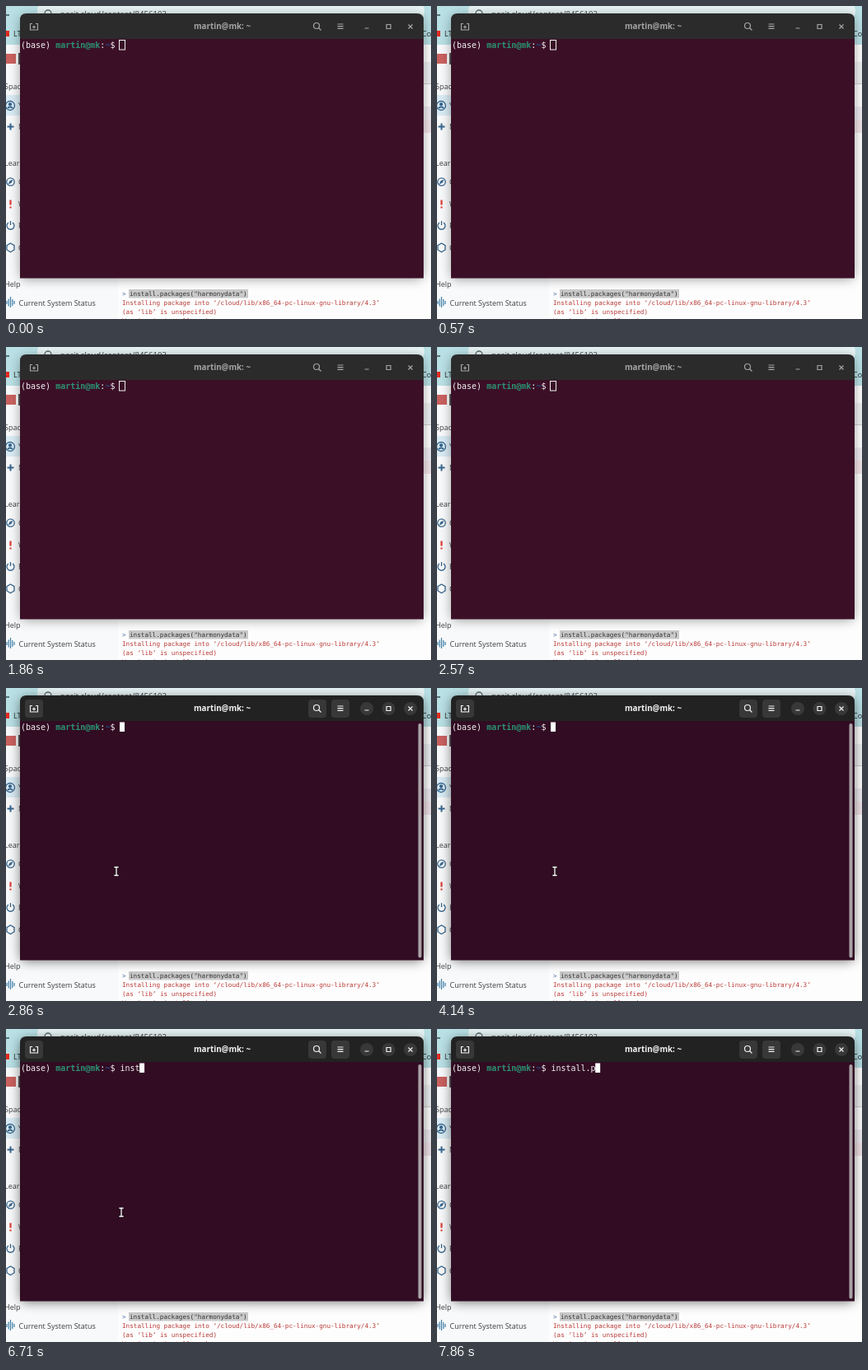
Recreate the animation shown at these times as an HTML page. Size 516 by 380 pixels, loop 8 s.

```html
<!DOCTYPE html>
<html lang="en">
<head>
<meta charset="utf-8">
<title>Terminal</title>
<style>
  html, body { margin: 0; width: 100%; height: 100%; overflow: hidden; background: #fbfbfb; }
  svg { display: block; width: 100%; height: 100%; }
  text { white-space: pre; }
  .ui { font: 9px "Open Sans", sans-serif; fill: #3c4043; }
  .console { font: 7.65px "DejaVu Sans Mono", monospace; fill: #b93a36; }
  .shell { font: 10px "DejaVu Sans Mono", monospace; fill: #f4f0f2; }
  .title { font: 700 9.8px "Open Sans", sans-serif; text-anchor: middle; }
  .line { fill: none; stroke: #35648c; stroke-width: 1.3; }
</style>
</head>
<body>
<svg viewBox="0 0 516 380">
  <defs>
    <filter id="blur" x="-10%" y="-10%" width="120%" height="120%"><feGaussianBlur stdDeviation="7"/></filter>
  </defs>

  <!-- browser -->
  <rect width="516" height="380" fill="#fdfdfd"/>
  <rect width="136" height="380" fill="#f8f9fa"/>
  <rect width="516" height="47" fill="#b9e0e5"/>
  <rect x="38" y="-8" width="470" height="28" rx="14" fill="#e6f2f3"/>
  <path d="M-3 11H4M20 11h8" stroke="#3b5054" stroke-width="1.4"/>
  <circle cx="51" cy="9" r="4" fill="none" stroke="#56696d" stroke-width="1.3"/>
  <text class="ui" x="66" y="13" style="font-size:9.6px">posit.cloud/content/8456103</text>
  <rect y="30" width="4" height="7" fill="#e32b20"/>
  <text class="ui" x="9" y="37" style="fill:#1d2a2c">LTI</text>
  <text class="ui" x="505" y="37" style="fill:#1d2a2c">Co</text>
  <rect x="506" y="68" width="10" height="26" fill="#eeeff1"/>
  <rect x="506" y="94" width="10" height="1" fill="#c9ccd0"/>
  <rect x="506" y="122" width="10" height="16" fill="#eeebf0"/>
  <rect x="506" y="138" width="10" height="16" fill="#f0e3e8"/>

  <!-- sidebar -->
  <rect y="58" width="12" height="12" fill="#c9615f"/>
  <rect x="15" y="57" width="2" height="14" fill="#555"/>
  <rect y="108" width="136" height="25" fill="#d9ebf4"/>
  <g class="ui">
    <text x="-2" y="101">Spaces</text>
    <text x="15" y="124">Your Workspace</text>
    <text x="15" y="150">New Space</text>
    <text x="-2" y="194">Learn</text>
    <text x="15" y="217">Guide</text>
    <text x="15" y="244">What's New</text>
    <text x="15" y="270">Recipes</text>
    <text x="15" y="297">Cheatsheets</text>
    <text x="-2" y="341">Help</text>
    <text x="15.500" y="364">Current System Status</text>
  </g>
  <g class="line">
    <circle cx="5" cy="121" r="5.500"/>
    <circle cx="5" cy="119.300" r="1.500" fill="#35648c"/>
    <path d="M2 124q3-3 6 0" stroke-width="2"/>
    <path d="M1.500 146.500h8M5.500 142.500v8" stroke-width="2"/>
    <circle cx="5.500" cy="213.500" r="4.700"/>
    <path d="M3 216l1.500-3.500L8 211l-1.500 3.500z" fill="#35648c" stroke-width=".5"/>
    <path d="M5.500 235.500v6M5.500 243.500v2" stroke="#dc3a35" stroke-width="2.200"/>
    <path d="M3 263a4.500 4.500 0 1 0 5 0M5.500 261v5"/>
    <path d="M5.500 288l4.500 2.700v5.300l-4.500 2.700L1 296v-5.300z"/>
    <path d="M1 358v4M3.200 355.500v9M5.500 353v13M7.800 356v8M10 358v4" stroke="#3f7fa8" stroke-width="1.200"/>
  </g>

  <!-- R console -->
  <rect x="149" y="344" width="145" height="10.500" fill="#c9c9c9"/>
  <g class="console">
    <text x="141" y="352" fill="#4b6fa5" style="fill:#4b6fa5">&gt;</text>
    <text x="150" y="352" style="fill:#333">install.packages("harmonydata")</text>
    <text x="141" y="362.500">Installing package into ‘/cloud/lib/x86_64-pc-linux-gnu-library/4.3’</text>
    <text x="141" y="374">(as ‘lib’ is unspecified)</text>
    <text x="141" y="384.500">Warning in install.packages :</text>
  </g>

  <!-- terminal -->
  <rect id="shadow" x="17" y="12" width="490" height="320" rx="8" filter="url(#blur)"/>
  <path id="body" d="M17 38H507V330.500H17z"/>
  <path id="bar" d="M17 40V17q0-8 8-8H499q8 0 8 8V40z"/>
  <g id="buttons" fill="#383838">
    <rect x="23" y="14" width="22" height="22" rx="4"/>
    <rect x="367" y="14" width="22" height="22" rx="4"/>
    <rect x="395" y="14" width="22" height="22" rx="4"/>
    <circle cx="438" cy="25" r="8"/>
    <circle cx="464.500" cy="25" r="8"/>
    <circle cx="491" cy="25" r="8"/>
  </g>
  <g id="icons" fill="none" stroke-width="1.200">
    <path d="M32 21.500h-2.500v7.500h9v-7.500H36M34 23.500v4M32 25.500h4"/>
    <circle cx="377" cy="24" r="3.500"/>
    <path d="M379.500 26.500l3 3M402.500 22h7M402.500 24.700h7M402.500 27.400h7M435.500 27h5M462 22.500h5v5h-5zM488.500 22.500l5 5M493.500 22.500l-5 5"/>
  </g>
  <text id="title" class="title" x="262.500" y="28">martin@mk: ~</text>
  <text class="shell" x="18" y="51">(base) <tspan fill="#2b9171" font-weight="700">martin@mk</tspan>:<tspan fill="#254d86" font-weight="700">~</tspan>$ <tspan id="typed"></tspan></text>
  <rect id="caret" y="41.500" width="6" height="11.500"/>
  <rect id="scroll" x="500.500" y="43" width="4" height="284.500" rx="2" fill="#aaa1a6"/>
  <g id="pointer" fill="none" stroke-linecap="square">
    <path d="M-2-5h4M0-5V5M-2 5h4" stroke="#1c0815" stroke-width="3"/>
    <path d="M-2-5h4M0-5V5M-2 5h4" stroke="#fff" stroke-width="1.300"/>
  </g>
</svg>
<script>
  const LOOP = 8000, FOCUS = 2720, HIDE = 7430, BLINK = 600;
  const COMMAND = "install.p";
  const KEYS = [5430, 5720, 6290, 6580, 6720, 6860, 7140, 7430, 7720];
  const PATH = [[2860, 134], [3710, 134], [4140, 143], [4710, 143], [5140, 140], [LOOP, 140]];

  const el = id => document.getElementById(id);
  const set = (id, attrs) => {
    for (const k in attrs) el(id).setAttribute(k, attrs[k]);
  };
  const show = (id, on) => set(id, { visibility: on ? "visible" : "hidden" });

  function along(points, t) {
    if (t <= points[0][0]) return points[0][1];
    const i = points.findIndex(p => p[0] >= t);
    const [t0, a] = points[i - 1], [t1, b] = points[i];
    return a + (b - a) * (t - t0) / (t1 - t0);
  }

  function draw(t) {
    const focused = t >= FOCUS;
    const count = KEYS.filter(k => k <= t).length;
    const wake = count ? KEYS[count - 1] : FOCUS;
    const lit = !focused || Math.floor((t - wake) / BLINK) % 2 === 0;
    const x = 138 + count * 6.02;

    set("shadow", { opacity: focused ? 0.5 : 0.35 });
    set("body", { fill: focused ? "#310c23" : "#3b1027" });
    set("bar", { fill: focused ? "#222222" : "#2b2b2b" });
    set("icons", { stroke: focused ? "#f2f2f2" : "#a5a5a5" });
    set("title", { fill: focused ? "#f4f4f4" : "#a5a5a5" });
    show("buttons", focused);
    show("scroll", focused);

    el("typed").textContent = COMMAND.slice(0, count);
    set("caret", focused
      ? { x, width: 6, fill: "#fff", stroke: "none" }
      : { x: x - 0.5, width: 7, fill: "none", stroke: "#eee" });
    show("caret", lit);

    show("pointer", focused && t < HIDE);
    set("pointer", { transform: `translate(${along(PATH, t)} 222.5)` });
  }

  function tick() {
    draw(performance.now() % LOOP);
    requestAnimationFrame(tick);
  }
  tick();
</script>
</body>
</html>
```
